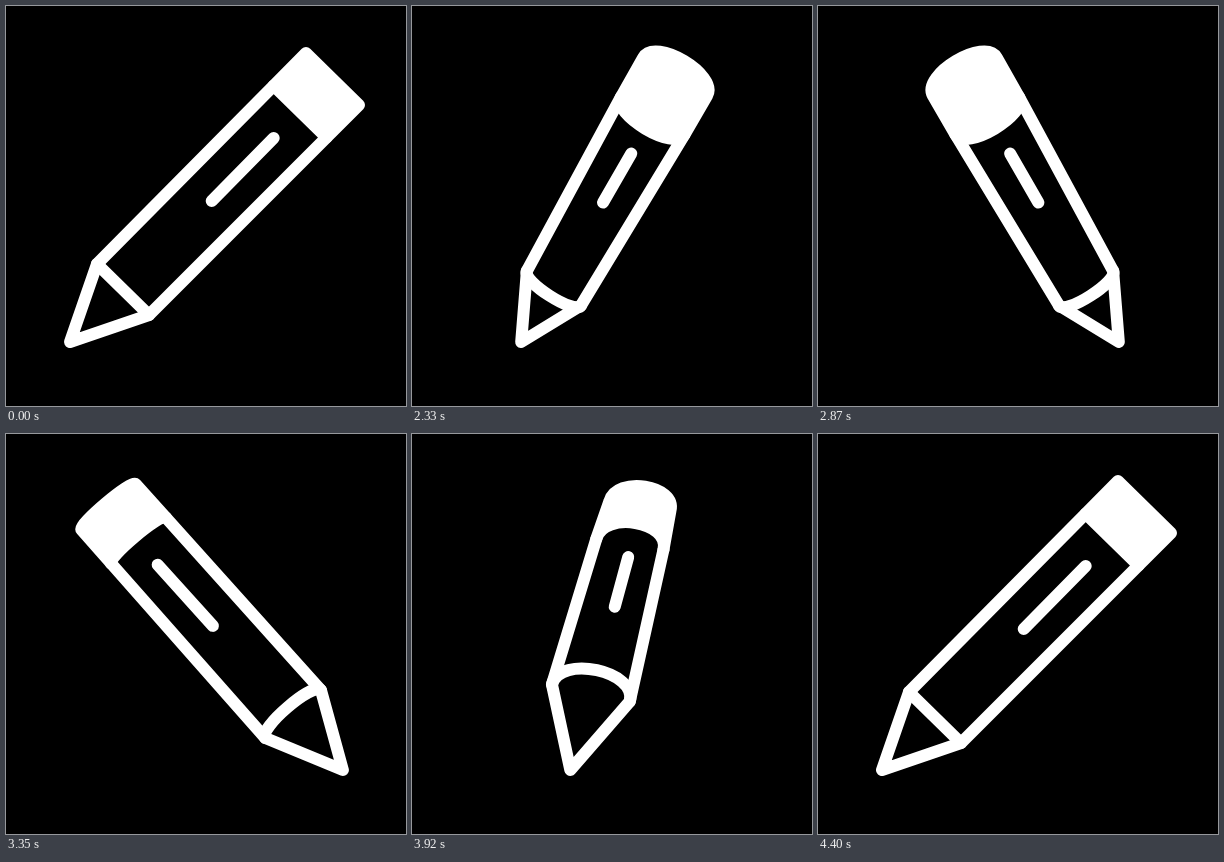
Write an HTML page that moves like this. It is 400 by 400 pixels and loops after 4430 ms.

```html
<!DOCTYPE html>
<html lang="en">
<head>
<meta charset="utf-8">
<title>Turning pencil</title>
<style>
  html, body { margin: 0; width: 100%; height: 100%; overflow: hidden; background: #000; }
  svg { display: block; width: 100%; height: 100%; }
  path { fill: none; stroke: #fff; stroke-width: 12; stroke-linecap: round; stroke-linejoin: round; }
  #eraser { fill: #fff; }
</style>
</head>
<body>
<svg viewBox="0 0 400 400">
  <path id="body"/>
  <path id="ring"/>
  <path id="slot"/>
  <path id="eraser"/>
</svg>
<script>
const LOOP = 4430, HOLD = 2000, STEP = 30, HALF = 40, AXIS = 205;
const el = id => document.getElementById(id);
const parts = { body: el('body'), ring: el('ring'), slot: el('slot'), eraser: el('eraser') };

// cubic-bezier(.41, 0, .59, 1)
function ease(x) {
  let lo = 0, hi = 1;
  for (let i = 0; i < 30; i++) {
    const u = (lo + hi) / 2, v = 1 - u;
    if (1.23 * u * v * v + 1.77 * u * u * v + u * u * u < x) lo = u; else hi = u;
  }
  return lo * lo * (3 - 2 * lo);
}

const pt = p => p[0].toFixed(2) + ' ' + p[1].toFixed(2);
const add = (p, d, k) => [p[0] + d[0] * k, p[1] + d[1] * k];
const mix = (a, b, k) => [a[0] + (b[0] - a[0]) * k, a[1] + (b[1] - a[1]) * k];

// Arc from a to b whose middle is pushed out by `bulge` along dir
const arc = (a, b, dir, bulge) =>
  `C${pt(add(a, dir, bulge * 4 / 3))} ${pt(add(b, dir, bulge * 4 / 3))} ${pt(b)}`;

const edge = (x, y, hx, hy) => ({ l: [x - hx, y - hy], r: [x + hx, y + hy], x, y });

function draw(step) {
  const back = step > HALF;
  const e = ease((back ? step - HALF : step) / HALF);
  const c = back ? 2 * e - 1 : 1 - 2 * e;
  const ss = Math.max(0, 1 - c * c), m = Math.sqrt(ss), soft = m ** 1.5;
  const p = back ? 0 : ss, q = back ? ss : 0;

  const tip = [AXIS - 141 * c, 336];
  const low = edge(AXIS - 88 * c * (1 + .1 * p - .13 * q * q), 283.5 - 2.5 * p - 27.5 * q,
                   26 + 2 * p + 14.5 * q, 25.5 * c);
  const top = edge(AXIS + 121.5 * c * (1 - .47 * soft), 73 - 4.5 * p - q,
                   26.5 + 10 * p + 4.5 * q, 26 * c * (1 + .15 * p - .5 * q));
  const k = .155 + .055 * ss, wide = [1.5 * ss, 0];
  const ml = add(mix(top.l, low.l, k), wide, -1);
  const mr = add(mix(top.r, low.r, k), wide, 1);

  const dx = top.x - low.x, dy = top.y - low.y, len = Math.hypot(dx, dy);
  const up = [dx / len, dy / len];

  parts.body.setAttribute('d',
    `M${pt(ml)}L${pt(low.l)}L${pt(tip)}L${pt(low.r)}L${pt(mr)}`);
  parts.ring.setAttribute('d',
    `M${pt(low.l)}${arc(low.l, low.r, up, back ? 25 * m : -12 * m)}`);
  parts.eraser.setAttribute('d',
    `M${pt(top.l)}${arc(top.l, top.r, up, back ? 22 * soft : 24.5 * m)}` +
    `L${pt(mr)}${arc(mr, ml, up, (back ? 24 : -24) * soft)}Z`);
  parts.slot.setAttribute('d',
    `M${pt([AXIS + .7 + c * (62 - 78 * p - 34 * q), 132 + 29 * p - 10 * q])}` +
    `L${pt([AXIS + .7 - c * (40 * p + 10 * q), 195 + 3 * p - 25 * q])}`);
}

const start = performance.now();
function frame() {
  const t = (performance.now() - start) % LOOP;
  draw(Math.min(2 * HALF, Math.max(0, Math.floor((t - HOLD) / STEP))));
  requestAnimationFrame(frame);
}
frame();
</script>
</body>
</html>
```
